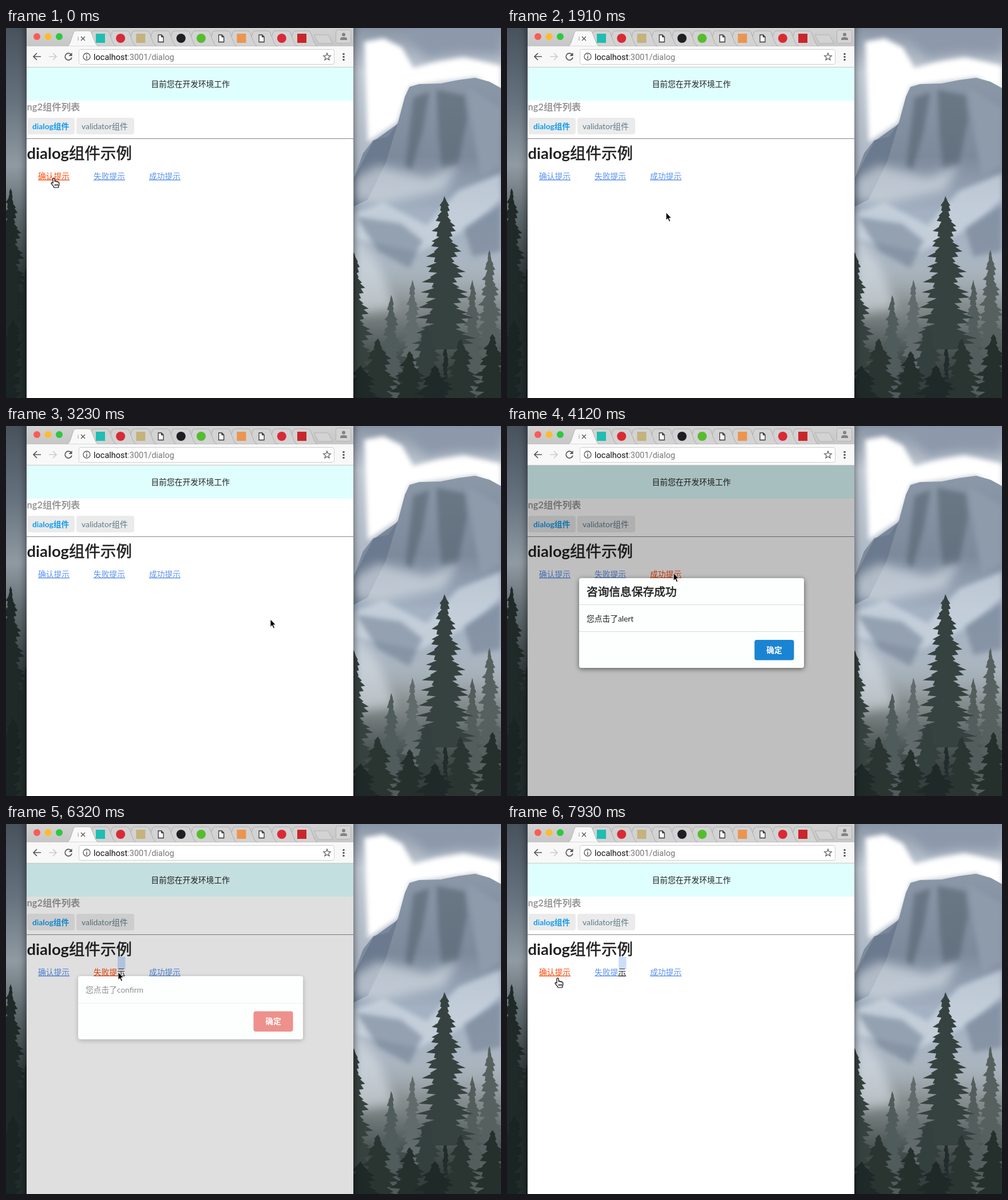
Write an HTML page that moves like this. It is 865 px wide and 647 px high and loops after 8000 ms.

```html
<!DOCTYPE html>
<html lang="zh">
<meta charset="utf-8">
<title>dialog</title>
<style>
html, body { margin: 0; width: 100%; height: 100%; overflow: hidden; }
svg { display: block; }
text { font: 13.75px Lato, "Noto Sans CJK SC", "Noto Sans CJK", sans-serif; fill: #222; white-space: pre; }
.bold { font-weight: 700; }
.mid { font-weight: 400; stroke: #222; stroke-width: .6; }
.link text { fill: #5a92ee; text-decoration: underline; }
.link.hot text { fill: #ff4a0a; }
.link .picked { fill: #222 !important; }
.line { fill: none; stroke: #555; stroke-width: 1.7; }
.box { fill: #fdfefe; filter: drop-shadow(0 2px 4px #0008); }
.soft { filter: blur(9px); }
.haze { filter: blur(4px); }
</style>
<svg width="865" height="647" viewBox="0 0 865 647">
  <defs>
    <linearGradient id="sky" x2="0" y2="1">
      <stop stop-color="#8995a5"/><stop offset=".12" stop-color="#c3cbd5"/><stop offset=".4" stop-color="#aab5c2"/>
      <stop offset=".65" stop-color="#a9b1b6"/><stop offset=".77" stop-color="#7d8585"/>
      <stop offset=".88" stop-color="#465150"/><stop offset="1" stop-color="#232d2b"/>
    </linearGradient>
    <linearGradient id="left" x2="0" y2="1">
      <stop stop-color="#47525d"/><stop offset=".2" stop-color="#66727e"/><stop offset=".37" stop-color="#8f9aa2"/>
      <stop offset=".5" stop-color="#606b70"/><stop offset=".7" stop-color="#28312f"/><stop offset="1" stop-color="#18211f"/>
    </linearGradient>
    <linearGradient id="rock" x2="0" y2="1">
      <stop stop-color="#8b98a8"/><stop offset=".35" stop-color="#7c8a9c"/><stop offset=".6" stop-color="#a3b1c2"/>
      <stop offset=".8" stop-color="#a9b5c1"/><stop offset="1" stop-color="#a9b5c1" stop-opacity="0"/>
    </linearGradient>
    <linearGradient id="bar" x2="0" y2="1"><stop stop-color="#d2d2d2"/><stop offset="1" stop-color="#c6c6c6"/></linearGradient>
  </defs>

  <rect width="865" height="647" fill="url(#sky)"/>
  <rect width="37" height="647" fill="url(#left)"/>
  <path class="haze" d="M626 24L660 18 692 34 712 70 752 58 800 50 865 66V112L820 86 705 102 684 165 632 200Z" fill="#fff"/>
  <path class="soft" d="M690 0H865V46L790 42 735 52Z" fill="#8c99ab"/>
  <path d="M608 262L624 219 642 196 668 190 685 165 697 120 705 103 722 98 760 97 790 91 820 87 845 94 865 105V480H608Z" fill="url(#rock)"/>
  <path class="haze" d="M752 108L802 118 806 160 790 238 762 246 756 190Z M712 122L740 112 728 180 708 250 698 240Z" fill="#56636f" opacity=".6"/>
  <path d="M608 262L642 198 684 168 664 235 632 300 608 312Z" fill="#66758a" opacity=".75"/>
  <path class="haze" d="M806 104L865 140V240L830 262 818 190Z" fill="#8e9bab"/>
  <path class="haze" d="M608 325L660 305 735 345 790 285 865 255V300L805 352 720 392 608 368Z" fill="#d0dae4" opacity=".7"/>
  <path class="haze" d="M612 330L690 342 728 372 705 420 650 390Z M800 350L865 310V390L815 400Z" fill="#66758a" opacity=".5"/>
  <path class="soft" d="M608 265L650 240 735 262 790 240 765 285 650 310 608 300Z M608 360L650 410 680 490 608 500Z" fill="#d5dce3" opacity=".65"/>
  <g id="forest"></g>

  <rect x="36" y="-12" width="571" height="680" fill="#fff" style="filter:drop-shadow(0 4px 7px #0009)"/>
  <rect x="36" width="571" height="32" fill="url(#bar)"/>
  <g id="tabs"></g>
  <path d="M106 32Q110 31 112 26L118 8Q119 5 122 5H145Q148 5 149 8L156 26Q158 31 162 32Z" fill="#f8f8f8" stroke="#aaa" stroke-width=".8"/>
  <rect x="36" y="32" width="571" height="36" fill="#f8f8f8"/>
  <rect x="36" y="68" width="571" height="1" fill="#c9c9c9"/>
  <circle cx="54" cy="15" r="6" fill="#fc5b57"/><circle cx="73.500" cy="15" r="6" fill="#fdbc2f"/><circle cx="93" cy="15" r="6" fill="#2dc840"/>
  <text x="125" y="22" style="font-size:9px;fill:#777">i</text>
  <path class="line" d="M131 15L138 22M138 15L131 22" style="stroke-width:1.300"/>
  <path d="M538 12H561Q563 12 564 14L571 27H548Q546 27 545 25Z" fill="#d3d3d3" stroke="#aaa" stroke-width=".8"/>
  <rect x="576.500" y="3.500" width="26" height="23" rx="3" fill="#d4d4d4" stroke="#b2b2b2"/>
  <path d="M584 21V19Q584 16 590 16T596 19V21Z" fill="#838383"/><circle cx="590" cy="11.500" r="3" fill="#838383"/>
  <path class="line" d="M61 50H49M54 44L48 50 54 56"/>
  <path class="line" d="M75 50H87M82 44L88 50 82 56" style="stroke:#ccc"/>
  <path class="line" d="M114 46.500A6 6 0 1 0 115 51.500"/><path d="M115.500 43V49H109.500Z" fill="#555"/>
  <rect x="127.500" y="37.500" width="446" height="26" rx="3" fill="#fff" stroke="#cfcfcf"/>
  <circle class="line" cx="141" cy="50" r="6" style="stroke-width:1.300"/>
  <path class="line" d="M141 49V54M141 46V47.500" style="stroke-width:1.500"/>
  <text x="153" y="55.500" style="font:14.500px Roboto,sans-serif;fill:#111">localhost<tspan fill="#777">:3001/dialog</tspan></text>
  <path class="line" d="M561 44L562.700 48.300 567.300 48.600 563.800 51.600 565 56 561 53.500 557 56 558.200 51.600 554.700 48.600 559.300 48.300Z" style="stroke-width:1.200"/>
  <path d="M588.500 44h3v3h-3zm0 5h3v3h-3zm0 5h3v3h-3z" fill="#555"/>

  <rect x="36" y="69" width="571" height="58" fill="#dfffff"/>
  <text x="253.500" y="103">目前您在开发环境工作</text>
  <text x="36.500" y="144" class="bold" style="font-size:16.400px;fill:#999">ng2组件列表</text>
  <rect x="37" y="157" width="83" height="29" rx="4" fill="#ebebeb"/>
  <rect x="123" y="157" width="101" height="29" rx="4" fill="#ebebeb"/>
  <text x="46" y="177" class="bold" style="fill:#139cec">dialog组件</text>
  <text x="132" y="177" style="font-size:13.900px;fill:#617b89">validator组件</text>
  <rect x="36" y="193" width="571" height="1" fill="#868686"/>
  <text x="36.500" y="229" class="bold" style="font-size:27.500px">dialog<tspan class="mid">组件示例</tspan></text>
  <rect id="selection" x="195" y="232" width="13.500" height="22" fill="#cbdffc"/>
  <g class="link"><text x="56" y="264">确认提示</text></g>
  <g class="link"><text x="153" y="264">失败提</text><text id="picked" x="194.250" y="264">示</text></g>
  <g class="link"><text x="250" y="264">成功提示</text></g>

  <g id="modal">
    <rect x="36" y="69" width="571" height="578" opacity=".25"/>
    <g id="dialog"></g>
  </g>
  <path id="cursor"/>
</svg>
<script>
const $ = id => document.getElementById(id);
const links = [...document.querySelectorAll('.link')];

function tree(x, top, w, h, fill) {
  const n = Math.round(h / 9) * 2, left = [], right = [];
  for (let i = 0; i <= n; i++) {
    const reach = w * (i / n) ** .65 * (i % 2 ? 1 : .62);
    const y = top + h * i / n + (i % 2 ? 3 : 0);
    left.push([x - reach * (.8 + .25 * Math.sin(i * 5 + x)), y]);
    right.unshift([x + reach * (.8 + .25 * Math.sin(i * 7 + x)), y]);
  }
  return `<polygon points="${left.concat(right).join(' ')}" fill="${fill}"/>`;
}
$('forest').innerHTML = [
  [710, 440, 30, 207, '#616b6c'], [673, 467, 30, 180, '#505b5b'], [845, 388, 38, 259, '#56605f'],
  [815, 440, 28, 207, '#525d5c'], [608, 392, 48, 255, '#37423f'], [768, 500, 8, 147, '#222c2b'],
  [766, 294, 57, 268, '#36423f'], [735, 520, 45, 127, '#34403e'], [650, 543, 52, 120, '#2a3532'],
  [705, 565, 46, 100, '#25302d'], [795, 543, 48, 120, '#2a3532'], [850, 535, 45, 120, '#25302d'],
  [750, 590, 50, 70, '#1f2a28'], [620, 590, 50, 70, '#1f2a28'],
  [8, 280, 38, 240, '#1f2a28'], [12, 510, 50, 140, '#1a2422'], [35, 420, 25, 227, '#222c2b']
].map(t => tree(...t)).join('');

const square = c => `<rect x="-8" y="-8" width="16" height="16" fill="${c}"/>`;
const disc = c => `<circle r="8" fill="${c}"/>`;
const page = '<path d="M-4.500 -6H1L4.500 -2.500V6.500H-4.500ZM1 -6V-2.500H4.500" fill="#fff" stroke="#333" stroke-width="1.300"/>';
const icons = [square('#1fbdb2'), disc('#d92a35'), square('#c5b27c'), page, disc('#1d1f22'), disc('#55bd2d'),
  page, square('#eb9550'), page, disc('#d92a35'), square('#c9262c')];
$('tabs').innerHTML = icons.map((icon, i) => `<g transform="translate(${165 + 35.2 * i} 18)">
  <path d="M-27 14Q-23 13 -21 8L-15 -10Q-14 -13 -11 -13H11Q14 -13 15 -10L22 8Q24 13 28 14Z"
    fill="#d3d3d3" stroke="#a5a5a5" stroke-width=".8"/>${icon}</g>`).reverse().join('');

const blue = ['#1a84d4', '#1678c2'], red = ['#df251e', '#d01207'];
const kinds = {
  confirm: { title: '<tspan class="bold">confirm</tspan>', body: '您点击了confirm', cancel: true, colors: blue },
  failure: { body: '您点击了confirm', colors: red },
  success: { title: '<tspan class="mid">咨询信息保存成功</tspan>', body: '您点击了alert', colors: blue }
};
// opening step, closing step, kind
const shows = [[2, 11, 'confirm'], [15, 21, 'failure'], [27, 33, 'success'], [43, 50, 'failure']];
// step, x, y of the pointer tip
const path = [[0, 84, 262], [4, 84, 262], [6, 354, 326], [7, 354, 326], [10, 371, 385], [12, 371, 385],
  [14, 185, 260], [16, 185, 260], [19, 462, 338], [23, 462, 338], [26, 291, 257], [28, 291, 257],
  [31, 458, 384], [33, 459, 388], [37, 459, 389], [41, 196, 259], [44, 196, 259], [46, 334, 326],
  [47, 334, 326], [49, 481, 338], [51, 481, 338], [54, 89, 269], [55, 89, 269]];
const arrow = 'M0 0V13.500L3 10.700 5.300 16 7.500 15 5.200 9.800H9.300Z';
const hand = 'M-2 9V2A1.600 1.600 0 0 1 1.200 2V6.500A1.500 1.500 0 0 1 4 6.900 1.500 1.500 0 0 1 6.700 7.600 1.300 1.300 0 0 1 8.700 8.600V12C8.700 14 7.500 15 7.500 17H0C-.5 14 -5 11 -5 9.500S-3.200 8 -2 9ZM1.700 11V14M4 11V14M6.300 11V14';

function button(x, y, label, fill, ink) {
  return `<rect x="${x}" y="${y}" width="69" height="35.500" rx="4" fill="${fill}"/>
    <text x="${x + 34.5}" y="${y + 22.5}" text-anchor="middle" class="bold" style="fill:${ink}">${label}</text>`;
}

function dialog({ title, body, cancel, colors }, over) {
  const y = title ? 313 : 266.5, rule = y => `<rect x="126" y="${y}" width="393" height="1" fill="#d9dcdc"/>`;
  return `<rect class="box" x="126" y="266" width="393" height="${y - 156}" rx="4"/>` +
    (title ? `<text x="139" y="296.500" style="font-size:19.700px">${title}</text>${rule(312)}` : '') +
    `<text x="139" y="${y + 28.5}">${body}</text>${rule(Math.floor(y + 46.5))}` +
    (cancel ? button(347, 374, '取消', over(347, 374) ? '#bababc' : '#e0e1e2', '#444') : '') +
    button(432.5, y + 61, '确定', colors[+over(432.5, y + 61)], '#fff');
}

function pointer(step) {
  const i = path.findIndex(p => p[0] > step), [a, x, y] = path[i - 1], [b, u, v] = path[i];
  const f = (step - a) / (b - a);
  return [x + (u - x) * f, y + (v - y) * f];
}

let shown = -1;
function draw(now) {
  requestAnimationFrame(draw);
  const step = Math.min(54, Math.floor((now % 8000 + 8) / 147));
  if (step === shown) return;
  shown = step;
  const [x, y] = pointer(step);
  const over = (left, top, w = 69, h = 35.5) => x >= left && x <= left + w && y >= top && y <= top + h;
  const hot = links.map((link, i) => over(56 + 97 * i, 252, 55, 19));
  links.forEach((link, i) => link.classList.toggle('hot', hot[i]));
  const picked = step >= 43;
  $('selection').style.display = picked ? '' : 'none';
  $('picked').classList.toggle('picked', picked);

  const show = shows.find(([open, close]) => step >= open && step <= close);
  let pointing = hot.includes(true);
  $('modal').style.opacity = !show ? 0 : step === show[0] || step === show[1] ? .5 : 1;
  if (show) {
    const kind = kinds[show[2]];
    $('dialog').innerHTML = dialog(kind, over);
    pointing = over(432.5, kind.title ? 374 : 327.5);
  }
  const cursor = $('cursor');
  cursor.setAttribute('d', pointing ? hand : arrow);
  cursor.setAttribute('transform', `translate(${x} ${y})`);
  cursor.setAttribute('fill', pointing ? '#fff' : '#000');
  cursor.setAttribute('stroke', pointing ? '#000' : '#fff');
  cursor.setAttribute('stroke-width', pointing ? 1.2 : .9);
}
requestAnimationFrame(draw);
</script>
</html>
```
